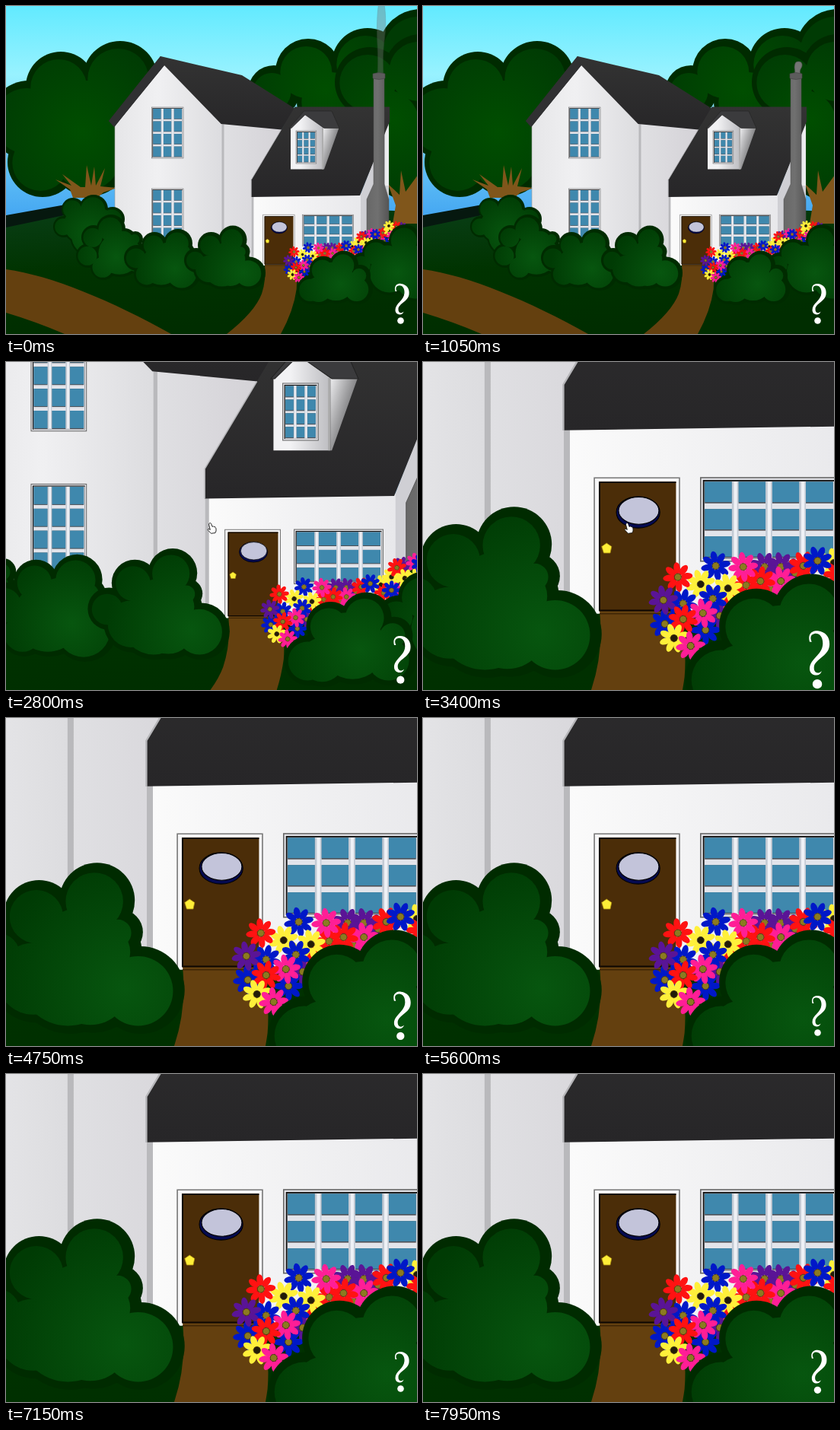
An HTML page for the animation above (8 s loop, 540 by 431 pixels).

```html
<!DOCTYPE html>
<html lang="en">
<head>
<meta charset="utf-8">
<title>Cottage</title>
<style>
html, body { margin: 0; width: 100%; height: 100%; overflow: hidden; background: #002e00; }
svg { display: block; width: 100vw; height: 100vh; }
</style>
</head>
<body>
<svg viewBox="0 0 540 431" preserveAspectRatio="none">
  <defs id="defs">
    <linearGradient id="sky" x2="0" y2="1"><stop stop-color="#62eaff"/><stop offset=".3" stop-color="#98f2ff"/><stop offset="1" stop-color="#3a9df0"/></linearGradient>
    <linearGradient id="ground" x2=".25" y2="1"><stop stop-color="#0a3f18"/><stop offset=".5" stop-color="#003300"/><stop offset="1" stop-color="#002d00"/></linearGradient>
    <linearGradient id="front"><stop stop-color="#e6e6e8"/><stop offset=".4" stop-color="#f0f0f2"/><stop offset="1" stop-color="#dcdcdf"/></linearGradient>
    <linearGradient id="side"><stop stop-color="#e0e0e3"/><stop offset="1" stop-color="#d4d2d7"/></linearGradient>
    <linearGradient id="porch"><stop stop-color="#fbfbfb"/><stop offset="1" stop-color="#e8e8eb"/></linearGradient>
    <linearGradient id="dormer"><stop offset=".3" stop-color="#f2f2f4"/><stop offset="1" stop-color="#bcbcc0"/></linearGradient>
    <linearGradient id="shade" x2=".6" y2=".5"><stop stop-color="#ededef"/><stop offset="1" stop-color="#858587"/></linearGradient>
    <linearGradient id="roof" x2="0" y2="1"><stop stop-color="#333"/><stop offset="1" stop-color="#272628"/></linearGradient>
    <linearGradient id="stack"><stop stop-color="#686868"/><stop offset=".5" stop-color="#707070"/><stop offset="1" stop-color="#555"/></linearGradient>
  </defs>

  <g id="world">
    <rect width="540" height="300" fill="url(#sky)"/>
    <path d="M0 275 95 258V310H0Z" fill="#06180f"/>
    <path d="M0 291 100 270 300 262 540 270V431H0Z" fill="url(#ground)"/>
    <g id="trees"></g>
    <g fill="#80561b">
      <path d="M88 252 84 241 65 228 86 236 74 221 98 238 104 238 106 209 112 236 116 211 118 236 130 213 124 237 146 239 128 245 120 252Z"/>
      <path d="M508 286 512 262 502 234 517 248 519 216 525 244 541 222V286Z"/>
    </g>
    <path d="M0 346C60 354 140 388 217 431H77Q40 415 0 403Z" fill="#64400f"/>

    <!-- gabled wing -->
    <path d="M143 158 207 76 285 154V345H143Z" fill="url(#front)" stroke="#999" stroke-width=".6"/>
    <path d="M284 154 363 162 324 228V345H284Z" fill="url(#side)"/>
    <path d="M283.5 154H286.5V345H283.5Z" fill="#b9b9bc"/>
    <path d="M203 66 310 91 380 135 362 162.5 282.7 155 208 78 142 159 135 151Z" fill="url(#roof)"/>
    <path d="M203 66 135 151 142 159 208 78Z" fill="#303032"/>

    <!-- low wing -->
    <path d="M465 249 503 152V300H465Z" fill="#cfcfd4"/>
    <path d="M498 158H503V236H498Z" fill="#ececef"/>
    <path d="M322.4 250 466 247V341H322.4Z" fill="url(#porch)"/>
    <path d="M322.4 250H325.4V341H322.4Z" fill="#b9b9bc"/>
    <path d="M379.5 132.5H504V152L465 248.9 322.2 250.9V228.5Z" fill="url(#roof)"/>
    <path d="M322.2 251V228.5L361.5 162.6" fill="none" stroke="#b5b5b8" stroke-width=".9"/>
    <path d="M374 160 393 141 417 160V214.6H374Z" fill="url(#dormer)"/>
    <path d="M417 160H437.5L418 214.6H417Z" fill="url(#shade)"/>
    <path d="M416 160V214.6" stroke="#aaa" stroke-width="1.6"/>
    <path d="M391.5 138H428L438 160.5H418L393 143 375 160.5H372Z" fill="#3b3b3d" stroke="#222" stroke-width=".6"/>
    <path id="smoke" fill="#777" stroke="#555" stroke-width=".7"/>
    <path d="M483 92H497V234L503 254V302H474V254L483 234Z" fill="url(#stack)" stroke="#505050" stroke-width=".5"/>
    <path d="M482 89Q490 86 498 89V95Q490 98 482 95Z" fill="#5c5c5c" stroke="#444" stroke-width=".6"/>
    <g id="windows"></g>

    <!-- door and path -->
    <path d="M340 339.5H379Q383 356 381.7 372 378 400 361 431H290Q327 402 336 378 342 360 340 339.5Z" fill="#64400f"/>
    <path d="M337.4 339.6V274.3H379.2V339.6" fill="#f6f6f7" stroke="#777" stroke-width=".6"/>
    <path d="M339.6 276.2H377.5V339.6H339.6Z" fill="#4b2d08"/>
    <path d="M377.5 276.5H340V339.4H378" fill="none" stroke="#0c0602" stroke-width=".7"/>
    <path d="M340 341H378.5" stroke="#3d2506" stroke-width=".6"/>
    <ellipse cx="358.9" cy="291.2" rx="10.7" ry="7.7" fill="#050a50" stroke="#000" stroke-width=".4"/>
    <ellipse cx="359.2" cy="290.4" rx="9.9" ry="6.7" fill="#c3c4da" stroke="#000" stroke-width=".4"/>
    <path d="M343.4 306.3 345.9 308 345.2 311.2H342L341 308Z" fill="#ffee38" stroke="#a98a10" stroke-width=".3"/>

    <g id="flowers"></g>
    <g id="bushes"></g>
  </g>

  <text id="knock" x="180" y="202.5" font-family="'Open Sans','Noto Sans',sans-serif" font-size="37" fill="#222">Knock</text>
  <g id="help" fill="#fff" role="img" aria-label="?">
    <path d="M511.5 375C509 366 516 364.5 519 365 527 366 530.5 372 529.5 379 528.5 388 516 391 515.5 398 515 403 519 405 522.5 401.5 521 407.5 511.5 406.5 511.5 399.5 511.5 390.5 523 387 523.5 377 523.8 370 520 366.8 516 367.5 512.5 368 511.5 371 513.5 375Z"/>
    <circle cx="518.5" cy="413.5" r="4.3"/>
  </g>
  <path id="hand" d="M267.2 212C268.4 211 269.4 211.8 269.8 213L271 216.4 272.4 215.8 273.2 216.6 274.6 216.4 275.2 217.6Q276.4 218 276 222L275 224.5 269.5 225.3 265 220.5Q265.3 218.8 267 219.6L268.3 220.4 266.6 214Q266.4 212.5 267.2 212Z" fill="#fff" stroke="#111" stroke-width=".9"/>
</svg>

<script>
const byId = id => document.getElementById(id);

function add(parent, tag, attrs) {
  const node = document.createElementNS('http://www.w3.org/2000/svg', tag);
  for (const key in attrs) node.setAttribute(key, attrs[key]);
  return parent.appendChild(node);
}

// Foliage: dark lobes with smaller, lit lobes on top. The light is "x,y,r".
let cloudCount = 0;
function cloud(parent, light, lobes, rim, lit = '#07560f') {
  const id = 'leaf' + cloudCount++;
  const [cx, cy, r] = light.split(',');
  const gradient = add(byId('defs'), 'radialGradient', { id, gradientUnits: 'userSpaceOnUse', cx, cy, r });
  add(gradient, 'stop', { 'stop-color': lit });
  add(gradient, 'stop', { offset: 1, 'stop-color': '#003b04' });
  const circles = lobes.split(' ').map(lobe => lobe.split(',').map(Number));
  for (const [x, y, r] of circles) add(parent, 'circle', { cx: x, cy: y, r, fill: '#002b00' });
  for (const [x, y, r] of circles)
    add(parent, 'circle', { cx: x - rim * .3, cy: y + rim * .1, r: r - rim, fill: `url(#${id})` });
}

const trees = byId('trees');
cloud(trees, '100,165,125', '150,95,49 72,106,46 30,150,52 48,205,46 110,150,62 110,198,52 150,170,60', 9, '#004e00');
cloud(trees, '420,110,110', '352,112,34 397,86,43 475,76,47 545,60,56 430,125,48 500,130,55', 9, '#004e00');
cloud(trees, '510,150,110', '478,100,46 545,85,48 500,155,55 535,195,62', 9, '#004e00');

function pane(x, y, w, h, cols, rows, gap = 3.2) {
  const rect = (x, y, width, height, fill, stroke = 'none') =>
    add(byId('windows'), 'rect', { x, y, width, height, fill, stroke, 'stroke-width': .6 });
  rect(x, y, w, h, '#e8e8ec', '#666');
  rect(x + 1.1, y + 1.1, w - 2.2, h - 2.2, '#111');
  rect(x + 1.8, y + 1.8, w - 3, h - 3, '#e2e4ea');
  const pw = (w - 4 - (cols - 1) * gap) / cols;
  const ph = (h - 4 - (rows - 1) * gap) / rows;
  for (let c = 0; c < cols; c++) {
    for (let r = 0; r < rows; r++) {
      const px = x + 2 + c * (pw + gap), py = y + 2 + r * (ph + gap);
      rect(px, py, pw, ph + .4, '#4d5057');
      rect(px, py, pw, ph - .2, '#3f88ad');
    }
  }
  for (let c = 1; c < cols; c++) {
    const bar = x + 2 + c * (pw + gap) - gap;
    rect(bar, y + 2, gap, h - 4, '#c3cad4');
    rect(bar + gap * .3, y + 2, gap * .5, h - 4, '#eef0f5');
  }
}
pane(191.3, 133, 41.7, 67, 3, 4);
pane(191.3, 240, 41.7, 67, 3, 4);
pane(381, 164, 26.8, 43, 3, 4, 2.1);
pane(389.6, 274.2, 67, 41, 4, 3);

const petalColors = { r: '#ff1212', y: '#fff03a', b: '#0018c8', k: '#ff1e96', p: '#5a1496' };
function flower(spec) {
  const color = spec[0], [x, y] = spec.slice(1).split(',').map(Number);
  const group = add(byId('flowers'), 'g', { transform: `translate(${x} ${y}) rotate(${x * 7 % 45})` });
  for (let a = 0; a < 360; a += 45)
    add(group, 'ellipse', { cx: 4.4, rx: 2.9, ry: 1.6, transform: `rotate(${a})`, fill: petalColors[color] });
  add(group, 'circle', { r: 1.7, fill: color === 'y' ? '#221c08' : '#8c7a20', stroke: '#4b3a10', 'stroke-width': .3 });
}
`p421,318 p429,318 p436,321 r405,336 p399,342 b392,349 b372,346 r412,327 k424,329 y455,316 r440,317.5
p471,302 y463,310 r457,322 k470,320 r467,303 y473,311 k481,299 p487,308 y481,311 b497,309 k491,304 r495,298 y503,295 p512,299 k507,302 p520,291 r513,290 b485,300
y503,289 b463,320 b447,315 k429,325 r419,325 k410.5,318 b397,317.5 y403,328.5 y389.6,326.5 r378.4,323 b381,336 p371.3,334.3 b395.6,333.6
k390.7,340.7 r381,343.7 y376.5,353 k384.7,356.8`.split(/\s+/).forEach(flower);

const bushes = byId('bushes');
cloud(bushes, '110,300,55', '115,267,19 88,267,15 76,290,14 140,280,16 112,302,28 100,287,26 125,285,22', 3);
cloud(bushes, '145,330,55', '138,293,19 115,304,16 170,306,10 108,328,16 150,325,31 128,343,17 172,335,17 155,310,18', 3.5);
cloud(bushes, '222,345,55', '226,312,19 195,314,17 172,331,17 205,340,30 234,324,14 232,350,24 186,352,18 215,328,22', 4);
cloud(bushes, '312,350,65', '298,307,18.5 269.5,314.5,17.5 250,334,16 309.5,322.5,11 285,344,28.5 319.5,351,21.5 296,348,24 268,345,22 290,328,22 302,332,18', 4.4);
cloud(bushes, '515,350,60', '487,325,19 524,308,21 468,340,16 535,335,25 505,350,30 538,360,28 502,332,22', 4);
cloud(bushes, '440,365,60', '444,340.5,19 417,347,18.3 401,373,19 465,354,14 435,362,29 412,372,21 462,372,20 430,352,20', 4.4);

const clamp = v => Math.max(0, Math.min(1, v));
const ramp = (t, from, to) => clamp((t - from) / (to - from));
const scaleAbout = (s, x, y) => `translate(${x} ${y}) scale(${s}) translate(${-x} ${-y})`;
const show = (id, opacity) => byId(id).setAttribute('opacity', opacity);

function drawSmoke(t) {
  const phase = (t / 4100 + .9) % 1;
  const h = 108 * phase, top = 90 - h, w = 4.5 + phase;
  const p = f => 90 - h * f;
  byId('smoke').setAttribute('d',
    `M488 90C490 ${p(.3)} ${492 - w} ${p(.45)} ${493 - w} ${p(.7)}S490 ${top} 494 ${top}
     S${494 + w} ${p(.75)} ${493 + w} ${p(.6)}S494 ${p(.3)} 496 90Z`);
  show('smoke', 1 - .75 * phase * phase);
}

function pulse(t) {
  const x = clamp(((t + 3340) % 5420) / 3420);
  return 1 + .25 * (1 - Math.cos(2 * Math.PI * x));
}

function render(t) {
  const zoom = 1 + 1.676 * ramp(t, 2380, 3330);
  byId('world').setAttribute('transform', scaleAbout(zoom, 404.4, 347.1));
  byId('help').setAttribute('transform', scaleAbout(pulse(t), 519.5, 391.5));
  show('hand', t >= 1200 && t < 3900 ? 1 : 0);
  show('knock', .65 * ramp(t, 6000, 6250) * (1 - ramp(t, 6400, 6800)));
  drawSmoke(t);
}

const start = performance.now();
function tick() {
  render((performance.now() - start) % 8000);
  requestAnimationFrame(tick);
}
tick();
</script>
</body>
</html>
```
